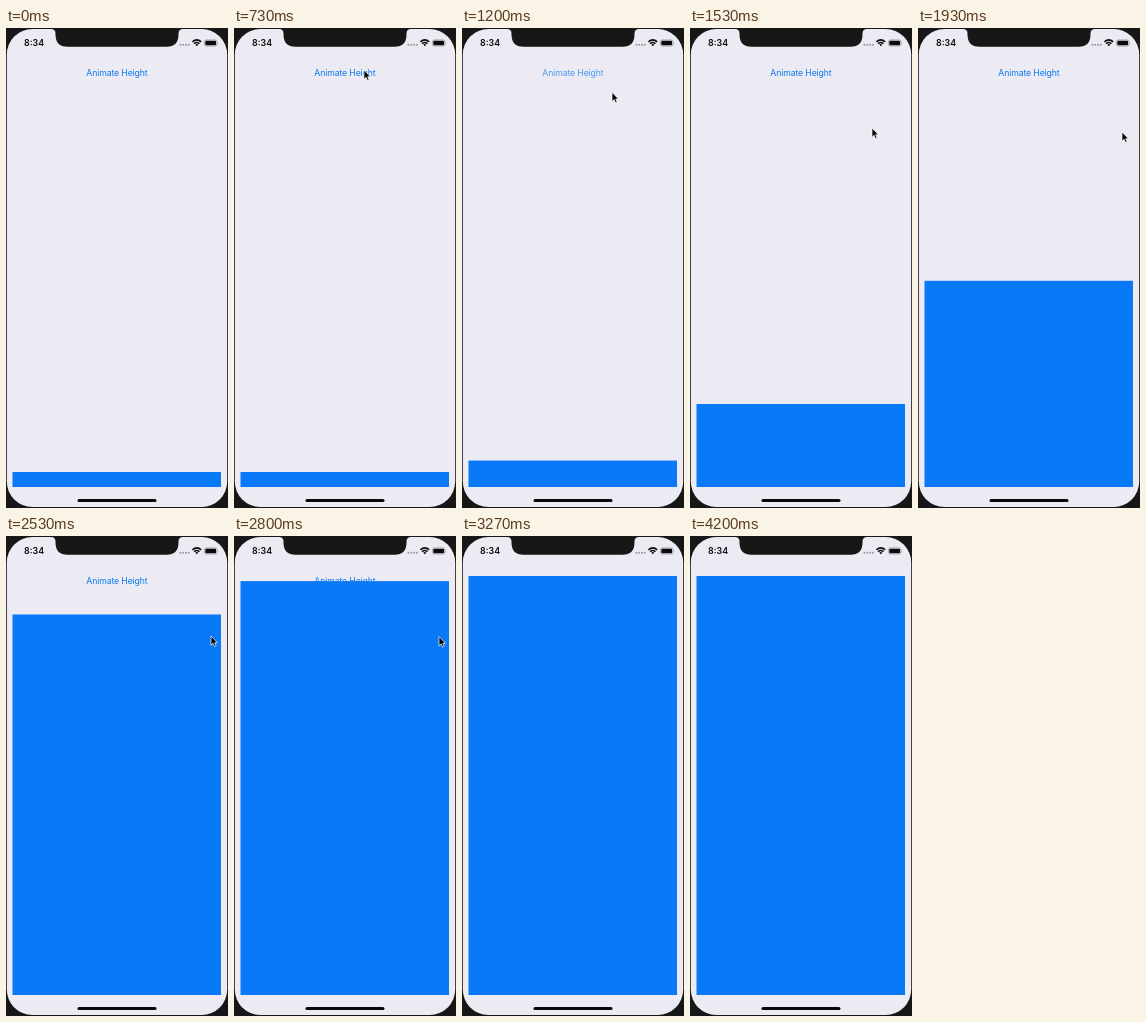
Write an HTML page that moves like this. It is 222 px wide and 480 px high and loops after 4.27 s.

```html
<!DOCTYPE html>
<html lang="en">
<head>
<meta charset="utf-8">
<title>Animate Height</title>
<style>
  html, body { margin: 0; width: 100%; height: 100%; overflow: hidden; background: #171717; }
  svg { display: block; width: 222px; height: 480px; }
  text { font-family: Inter, Roboto, sans-serif; }
</style>
</head>
<body>
<svg viewBox="0 0 222 480">
  <rect x="0.8" y="1" width="220.4" height="478" rx="25.5" fill="#ecebf3"/>
  <path d="M45 0V1Q49.5 1 49.5 5.500V6.500Q49.500 18.700 61.500 18.700H160.500Q172.500 18.700 172.500 6.500V5.500Q172.500 1 177 1V0Z" fill="#171717"/>

  <text x="18" y="18" font-size="8.900" font-weight="600" fill="#0b0b0d">8:34</text>
  <g fill="#98979e">
    <circle cx="174.400" cy="16.700" r="1"/><circle cx="177.200" cy="16.700" r="1"/>
    <circle cx="180" cy="16.700" r="1"/><circle cx="182.800" cy="16.700" r="1"/>
  </g>
  <g fill="none" stroke="#0b0b0d" stroke-width="1.500">
    <path d="M186.400 13.900Q190.800 9.800 195.200 13.900"/>
    <path d="M188.100 15.700Q190.800 13.200 193.500 15.700"/>
  </g>
  <path d="M189.300 16.700Q190.800 15.500 192.300 16.700L190.800 18.300Z" fill="#0b0b0d"/>
  <rect x="198.400" y="11.900" width="12.600" height="6.200" rx="1.800" fill="none" stroke="#929198" stroke-width="0.700"/>
  <rect x="199.300" y="12.800" width="10.800" height="4.400" rx="1" fill="#0b0b0d"/>
  <path d="M211.800 14Q212.800 15 211.800 16Z" fill="#929198"/>

  <text id="button" x="110.900" y="48" font-size="8.700" letter-spacing="-0.120" text-anchor="middle" fill="#0a7aef">Animate Height</text>
  <rect id="panel" x="6.500" width="208.500" fill="#0a79f8"/>
  <rect x="71.500" y="471" width="79" height="3" rx="1.500" fill="#08080a"/>
  <path id="cursor" d="M0 0V9.200L2.100 7.300L3.500 10.500L5.100 9.800L3.700 6.700H6.400Z" fill="#000" stroke="#fff" stroke-width="0.700" stroke-linejoin="round"/>
</svg>
<script>
const LOOP = 4270, BOTTOM = 459;
const [button, panel, cursor] = ["button", "panel", "cursor"].map(id => document.getElementById(id));

// time, x, y of the pointer tip
const path = [
  [330, 204, 103], [730, 130, 42], [960, 130, 42], [1530, 182, 100],
  [1930, 204, 104], [2530, 205, 100], [3000, 205, 101], [3270, 224, 102]
];

const clamp = v => Math.min(1, Math.max(0, v));
const smooth = p => p * p * (3 - 2 * p);

// cubic-bezier(.42, 0, .58, 1)
function easeInOut(x) {
  let lo = 0, hi = 1;
  for (let i = 0; i < 24; i++) {
    const s = (lo + hi) / 2, r = 1 - s;
    if (1.26 * r * r * s + 1.74 * r * s * s + s * s * s < x) lo = s; else hi = s;
  }
  return smooth(lo);
}

function draw(t) {
  const height = 15 + 404 * easeInOut(clamp((t - 962) / 2000));
  panel.setAttribute("y", BOTTOM - height);
  panel.setAttribute("height", height);

  // pressed, then released
  button.style.opacity = t < 870 ? 1 : 0.2 + 0.8 * clamp((t - 960) / 370);

  const i = path.findIndex(p => p[0] > t);
  cursor.style.display = i > 0 ? "" : "none";
  if (i > 0) {
    const [t0, x0, y0] = path[i - 1], [t1, x1, y1] = path[i];
    const p = smooth((t - t0) / (t1 - t0));
    cursor.setAttribute("transform", `translate(${x0 + (x1 - x0) * p} ${y0 + (y1 - y0) * p})`);
  }
}

const start = performance.now();
function tick() {
  draw((performance.now() - start) % LOOP);
  requestAnimationFrame(tick);
}
tick();
</script>
</body>
</html>
```
